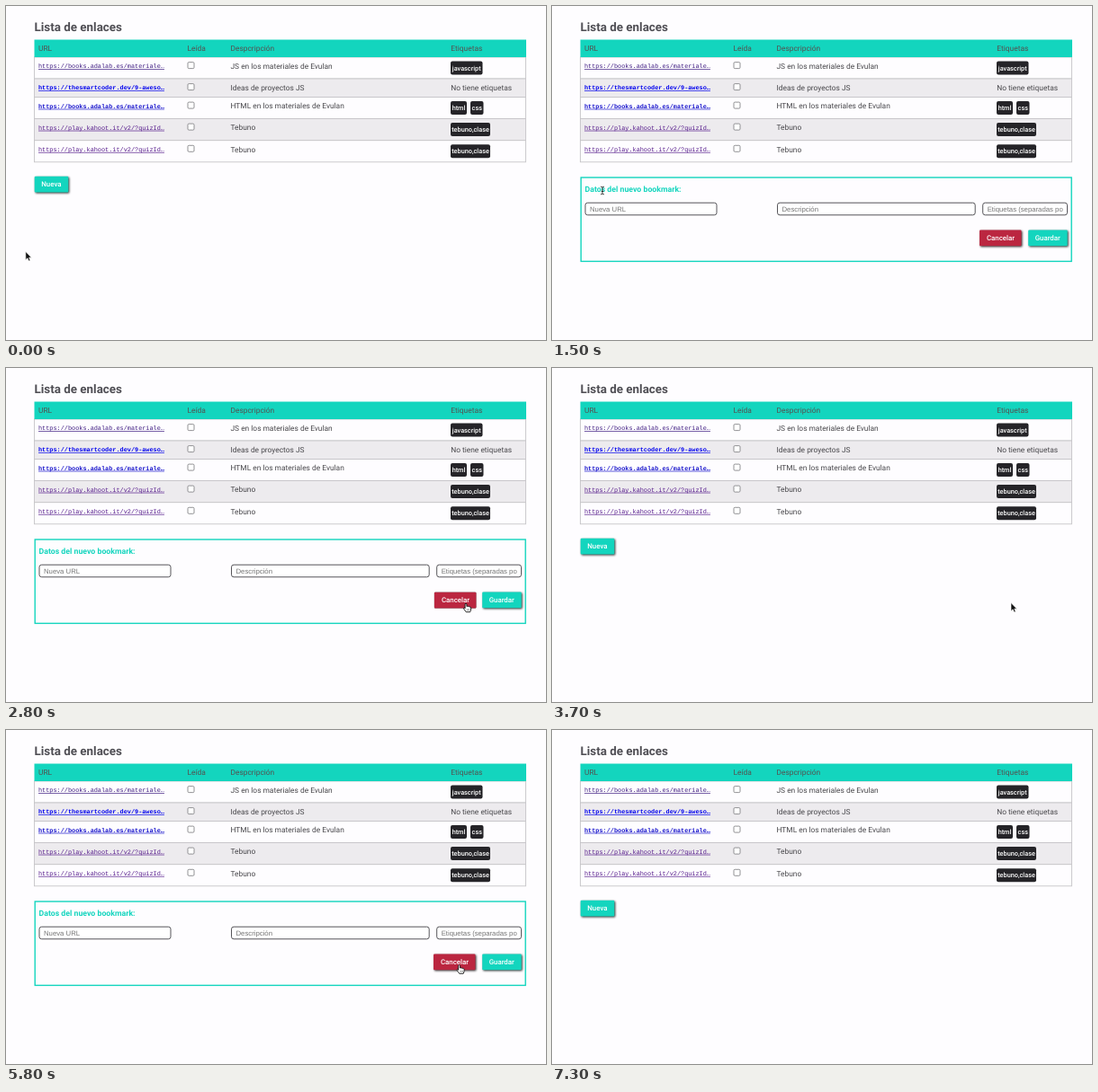
Animation of 600 by 372 pixels, one loop 7.9 s. Source, as an HTML page:

```html
<!DOCTYPE html>
<html lang="es">
<head>
<meta charset="utf-8">
<title>Lista de enlaces</title>
<style>
html, body { margin: 0; width: 100%; height: 100%; overflow: hidden; background: #fefdff; }
svg { display: block; width: 600px; height: 372px; }
text { font: 400 8.4px Roboto, sans-serif; fill: #48474b; text-rendering: geometricPrecision; white-space: pre; }
.title { font-size: 13.4px; font-weight: 700; fill: #4f4e54; }
.head { fill: #55504f; }
.url { font: 400 6.87px "Liberation Mono", monospace; text-decoration: underline; }
.tag { font-size: 7.3px; font-weight: 500; fill: #fff; }
.btn { font-size: 7.85px; font-weight: 500; fill: #fff; }
.legend { font-size: 8.75px; font-weight: 700; fill: #13d5be; }
.hint { font: 400 7.75px "Liberation Sans", sans-serif; fill: #757575; }
</style>
</head>
<body>
<svg id="stage" viewBox="0 0 600 372">
  <g id="table"></g>
  <g id="closed"></g>
  <g id="open"></g>
  <g id="cursor">
    <path id="arrow" d="M0 0V9.2L2.1 7.3L3.6 10.6L5.2 9.9L3.8 6.7H6.5Z" fill="#111" stroke="#fff" stroke-width=".6"/>
    <g id="hand">
      <path d="M-.9 .8Q0-.5.9.8V3.5Q1.9 2.9 2.6 3.7Q3.6 3.2 4.2 4.1Q5.3 3.8 5.6 5V7Q5.4 8.3 4.7 9.8H.2Q-.8 8.1-2.4 6.3Q-2.9 5.2-1.9 5L-.9 5.8Z" fill="#fff" stroke="#111" stroke-width=".9" stroke-linejoin="round"/>
      <path d="M1.3 6.3V8.4M2.6 6.3V8.4M3.9 6.3V8.4" stroke="#333" stroke-width=".4"/>
    </g>
    <path id="beam" d="M-1.9-4.3Q-.2-4.3 0-3.3Q.2-4.3 1.9-4.3M0-3.3V3.3M-1.9 4.3Q-.2 4.3 0 3.3Q.2 4.3 1.9 4.3M-1.2 1H1.2" fill="none" stroke="#222" stroke-width=".9"/>
  </g>
</svg>
<script>
const $ = id => document.getElementById(id);
const TEAL = '#13d5be', DARK = '#252428', LINE = '#c6c5c8';

const text = (x, y, s, cls = '', extra = '') => `<text x="${x}" y="${y}" class="${cls}" ${extra}>${s}</text>`;
const rect = (x, y, w, h, fill, extra = '') => `<rect x="${x}" y="${y}" width="${w}" height="${h}" fill="${fill}" ${extra}/>`;
const button = (id, x, y, w, h, fill, label, pad) =>
  `<g id="${id}">${rect(x, y, w, h, fill, 'rx="1"')}${text(x + pad, y + 11.1, label, 'btn')}</g>`;
const input = (x, w, hint) =>
  rect(x, 219.2, w, 13.6, '#fff', 'rx="2.6" stroke="#555459"') + text(x + 5, 228.7, hint, 'hint');

// top, bottom, link, link colour, description, tags as [x, width, label]
const rows = [
  [57, 81, 'https://books.adalab.es/materiale…', '#3d1a80', 'JS en los materiales de Evulan', [[494, 35.5, 'javascript']]],
  [81, 101.5, 'https://thesmartcoder.dev/9-aweso…', '#0000ee', 'Ideas de proyectos JS', []],
  [101.5, 125.5, 'https://books.adalab.es/materiale…', '#1a16cc', 'HTML en los materiales de Evulan', [[494, 18, 'html'], [516, 14.5, 'css']]],
  [125.5, 149.7, 'https://play.kahoot.it/v2/?quizId…', '#551a8b', 'Tebuno', [[494, 44, 'tebuno,clase']]],
  [149.7, 173.8, 'https://play.kahoot.it/v2/?quizId…', '#551a8b', 'Tebuno', [[494, 44, 'tebuno,clase']]]
];

function buildTable() {
  let out = text(31.5, 27.8, 'Lista de enlaces', 'title');
  rows.forEach(([top, end, link, color, desc, tags], i) => {
    const base = top + 12.8;
    out += rect(31.5, top, 546, end - top, i % 2 ? '#edebee' : '#fefdff', `stroke="${LINE}" stroke-width=".9"`);
    out += text(36, base - .6, link, 'url', `style="fill:${color};font-weight:${i === 1 || i === 2 ? 700 : 400}"`);
    out += rect(202, top + 5.6, 7, 7, '#fff', 'rx="1.2" stroke="#77767a" stroke-width=".8"');
    out += text(249.5, base, desc);
    if (!tags.length) out += text(494.2, base, 'No tiene etiquetas');
    for (const [x, w, label] of tags) {
      out += rect(x, top + 4.6, w, 15, DARK, 'rx="2"');
      out += text(x + w / 2, top + 14.6, label, 'tag', 'text-anchor="middle"');
    }
  });
  out += rect(31.5, 37.5, 546.5, 19.5, TEAL);
  [[36, 'URL'], [201.5, 'Leída'], [249.5, 'Despcripción'], [494.3, 'Etiquetas']]
    .forEach(([x, s]) => out += text(x, 49.6, s, 'head'));
  return out;
}

$('table').innerHTML = buildTable();
$('closed').innerHTML = button('add', 31.7, 189.8, 37.6, 17.7, TEAL, 'Nueva', 7.6);
$('open').innerHTML =
  rect(32.2, 191, 545, 93.4, 'none', `stroke="${TEAL}" stroke-width="1.4"`) +
  text(36.5, 207.3, 'Datos del nuevo bookmark:', 'legend') +
  input(37, 146, 'Nueva URL') + input(250.5, 219.7, 'Descripción') + input(478.7, 93.8, 'Etiquetas (separadas po') +
  button('cancel', 475, 249.5, 46.5, 17.8, '#bb2640', 'Cancelar', 8) +
  button('save', 529.2, 249.5, 43.5, 17.8, TEAL, 'Guardar', 7.5);

const LOOP = 7900, STEP = 100;
const start = [21.8, 273.5];
// begin, end, destination
const moves = [
  [100, 800, [56, 205.5]],
  [1800, 2500, [511, 262]],
  [3600, 3700, [510, 261.5]],
  [3900, 4400, [66.5, 202.5]],
  [4900, 5000, [67, 206]],
  [5300, 5800, [503.5, 261.5]]
];
// press, release, button
const clicks = [[800, 1000, 'add'], [2600, 3000, 'cancel'], [4600, 5000, 'add'], [6800, 7200, 'cancel']];

const ease = p => p * p * (3 - 2 * p);

function pointer(t) {
  let pos = start;
  for (const [a, b, to] of moves) {
    if (t < a) break;
    const p = ease(Math.min(1, (t - a + STEP) / (b - a + STEP)));
    pos = pos.map((v, i) => v + (to[i] - v) * p);
  }
  return pos;
}

const within = (x, y, l, t, r, b) => x > l && x < r && y > t && y < b;

function cursorKind(x, y, open) {
  if (!open) return within(x, y, 31, 189, 70, 208) ? 'hand' : 'arrow';
  if (within(x, y, 475, 249, 522, 268)) return 'hand';
  return within(x, y, 36, 200, 145, 211) ? 'beam' : 'arrow';
}

function press(id, p) {
  const el = $(id), d = 1.6 - p;
  el.setAttribute('transform', `translate(${.9 * p} ${.3 * p})`);
  el.firstChild.style.filter = `drop-shadow(${d}px ${d}px ${.9 - .5 * p}px #333)`;
}

const show = (id, on) => $(id).style.display = on ? '' : 'none';

function draw(now) {
  const t = Math.floor(now % LOOP / STEP) * STEP;
  const open = clicks.filter(c => t >= c[1]).length % 2 === 1;
  const [x, y] = pointer(t);
  const kind = cursorKind(x, y, open);
  const held = { add: 0, cancel: 0, save: 0 };
  for (const [a, b, id] of clicks)
    if (t >= a && t < b) held[id] = Math.min(1, (t - a + STEP) / 300);
  for (const id in held) press(id, held[id]);
  show('closed', !open);
  show('open', open);
  show('cursor', !(t >= 3000 && t < 3700) && t < 7200);
  for (const k of ['arrow', 'hand', 'beam']) show(k, k === kind);
  $('cursor').setAttribute('transform', `translate(${x} ${y})`);
}

const origin = performance.now();
function tick() {
  draw(performance.now() - origin);
  requestAnimationFrame(tick);
}
tick();
</script>
</body>
</html>
```
